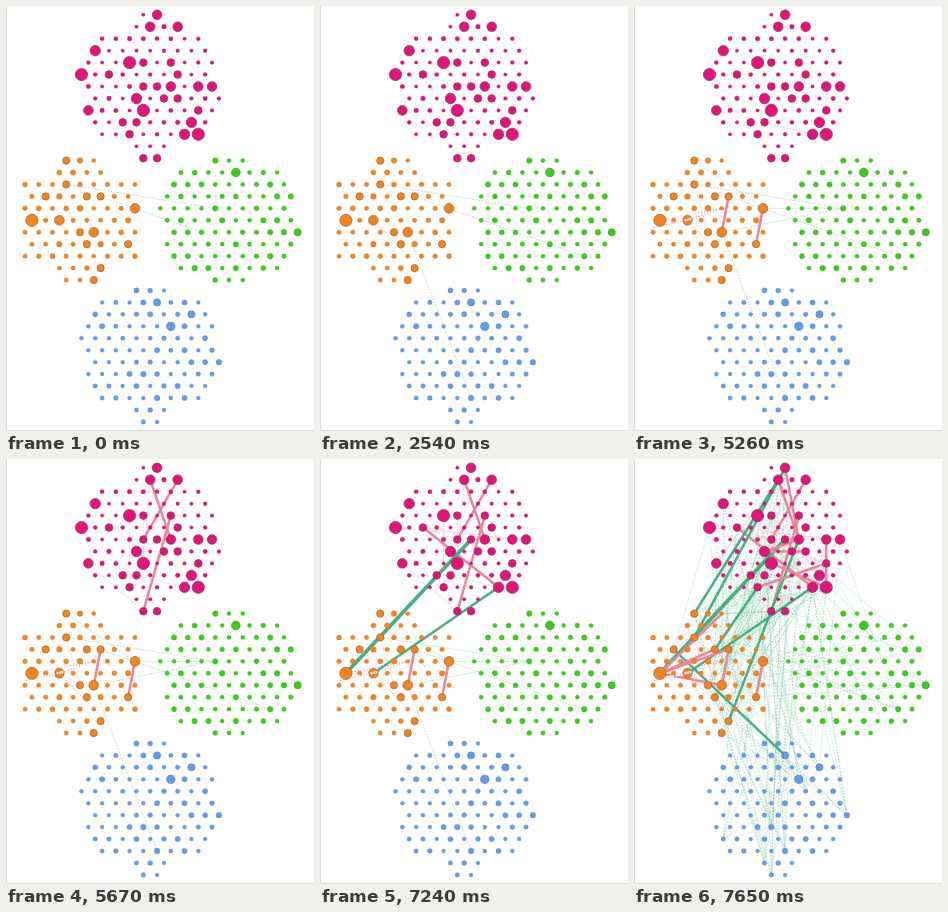
Recreate the animation shown at these times as an HTML page. Size 308 px wide and 425 px high, loop 8 s.

```html
<!DOCTYPE html>
<html lang="en">
<head>
<meta charset="utf-8">
<title>Cluster links</title>
<style>
html, body { margin: 0; width: 100%; height: 100%; overflow: hidden; background: #fff; }
svg { display: block; width: 100vw; height: 100vh; }
.step { animation: 8s step-end infinite; }
.fine { stroke-width: .7; stroke-dasharray: 2 1.2; }
.mint { stroke: #a9d6bd; }
.web { stroke: #6cc39b; opacity: .5; }
.rose { stroke: #f3b9c4; }
.red { stroke: #e0526a; stroke-dasharray: 1 2; }
.gap { stroke: #fff; stroke-width: 2.2; stroke-dasharray: 7 2; }
.pink { stroke: #ea8698; stroke-width: 2.5; }
.jade { stroke: #45b083; stroke-width: 2.5; }
.wide { stroke: #45b083; stroke-width: 3.8; }
</style>
</head>
<body>
<svg viewBox="0 0 308 425" preserveAspectRatio="none">
  <path d="M.5 0V424.5H308" fill="none" stroke="#dcdcdc"/>
  <g id="links"></g>
  <g id="dots"></g>
  <g id="over"></g>
</svg>
<script>
const NS = 'http://www.w3.org/2000/svg';
const LOOP = 8000, DX = 6.87, DY = 11.95;
const byId = id => document.getElementById(id);

function add(parent, tag, attrs) {
  const el = document.createElementNS(NS, tag);
  for (const k in attrs) el.setAttribute(k, attrs[k]);
  return parent.appendChild(el);
}

let seed = 41;
const rnd = () => (seed = seed * 16807 % 2147483647) / 2147483647;

// Half-width of a cluster by distance from its middle row.
const ROUND = [9, 10, 9, 8, 7, 2, 1], BLOCK = [8, 8, 8, 8, 3, 2];

// Hubs are grouped by radius and placed in grid steps from the centre.
const clusters = {
  p: { x: 144.2, y: 80.5, up: 6, down: 6, reach: ROUND, base: 1.75, fill: '#e8107a', rim: '#8c3a63', hubs: [
    [6.3, [[-3, -2], [-10, -1], [-1, 2], [7, 4]]],
    [5.4, [[-8, -3], [-2, 1], [6, 3], [5, 4]]],
    [5, [[1, -6], [0, -5], [4, -5], [3, 0], [7, 0], [9, 0], [-9, 2]]],
    [4, [[4, -1], [-1, -2], [3, -2], [-6, -1], [-1, 0], [2, 1], [4, 1],
      [-4, 3], [-2, 3], [-3, 4], [-1, 6], [1, 6], [7, 2], [1, 0]]]] },
  o: { x: 74, y: 214.3, up: 5, down: 5, reach: BLOCK, base: 2.2, fill: '#f5841f', rim: '#a9672a', hubs: [
    [6.3, [[-7, 0]]],
    [5, [[2, 1], [-3, 0], [8, -1]]],
    [3.8, [[-2, -5], [-2, -3], [-5, -2], [1, -2], [3, -2], [0, 1], [1, 2], [7, 2], [3, 4], [2, 5]]],
    [2.3, [[2, -5], [2, -1], [2, 3]]]] },
  g: { x: 223, y: 214.3, up: 5, down: 5, reach: ROUND, base: 2.1, fill: '#38d014', rim: '#3a9a26', hubs: [
    [4.5, [[1, -4]]],
    [3.7, [[10, 1]]],
    [3, [[6, -3], [9, -2], [6, 3], [1, 2], [-2, -1], [7, -2], [5, 0]]]] },
  b: { x: 144.2, y: 344.2, up: 5, down: 6, reach: ROUND, base: 2, fill: '#649ce8', rim: '#4f82c8', hubs: [
    [4.3, [[3, -2]]],
    [3.7, [[1, -4], [6, -3]]],
    [3.1, [[10, 1], [-1, 2], [1, 4]]],
    [2.5, [[-8, 3], [4, -1], [-2, 5], [-1, 6], [-5, -4]]]] }
};

const hubs = {};
for (const key in clusters) {
  const c = clusters[key], taken = new Set();
  hubs[key] = [];
  const dot = (dx, dy, r) => {
    const cx = c.x + DX * dx, cy = c.y + DY * dy;
    add(byId('dots'), 'circle', { cx, cy, r, fill: c.fill, stroke: c.rim, 'stroke-width': r > 3.2 ? .8 : .2 });
    taken.add(dx + ',' + dy);
    return [cx, cy];
  };
  for (const [r, spots] of c.hubs) {
    for (const [dx, dy] of spots) hubs[key].push(dot(dx, dy, r - .2));
  }
  for (let dy = -c.up; dy <= c.down; dy++) {
    const w = c.reach[Math.abs(dy)];
    for (let dx = -w; dx <= w; dx++) {
      const onGrid = (dx + dy) % 2 !== 0;
      const cut = Math.abs(dx) === 10 && dx * dy < 0;
      if (onGrid && !cut && !taken.has(dx + ',' + dy)) dot(dx, dy, c.base * (1 + .4 * rnd() ** 3));
    }
  }
}

// Groups appear at a set time and stay until the loop restarts.
const sheet = document.createElement('style');
document.head.append(sheet);
const made = new Set();
function stepAt(ms, layer) {
  const g = add(byId(layer), 'g', {});
  if (!ms) return g;
  if (!made.has(ms)) {
    made.add(ms);
    sheet.textContent += `@keyframes at${ms}{0%{visibility:hidden}${ms / LOOP * 100}%,100%{visibility:visible}}`;
  }
  g.setAttribute('class', 'step');
  g.style.animationName = 'at' + ms;
  return g;
}

function draw(ms, cls, lines, layer = 'links') {
  const g = stepAt(ms, layer);
  for (const [[x1, y1], [x2, y2]] of lines) add(g, 'line', { x1, y1, x2, y2, class: cls });
}

// 'o0-p3' joins hub 0 of the orange cluster to hub 3 of the pink one.
const hub = name => hubs[name[0]][+name.slice(1)];
const link = (ms, cls, list) => draw(ms, cls, list.split(' ').map(s => s.split('-').map(hub)));

const pick = list => list[Math.floor(rnd() * list.length)];
const web = (ms, cls, from, to, n) =>
  draw(ms, cls, Array.from({ length: n }, () => [pick(hubs[from]), pick(hubs[to])]));

const mint = 'fine mint', net = 'fine web', rose = 'fine rose', red = 'fine red';

web(7650, net, 'p', 'o', 60);
web(7650, net, 'p', 'b', 26);
web(7650, net, 'o', 'b', 22);
web(7650, net, 'p', 'g', 8);
web(7650, net, 'o', 'g', 5);
web(7650, rose, 'p', 'p', 16);
web(7650, rose, 'o', 'o', 8);
web(7450, net, 'p', 'o', 20);
web(7450, net, 'p', 'b', 7);
web(7450, net, 'o', 'b', 7);
web(7450, net, 'o', 'g', 3);
web(7450, rose, 'p', 'p', 8);
web(5670, rose, 'p', 'p', 9);

link(0, mint, 'o5-g6 o8-g4');
link(1150, red, 'o2-o16');
link(1310, mint, 'o1-b5');
link(2540, rose, 'g2-g7');
link(3910, red, 'o0-o15 o2-o15');
draw(3910, 'gap', [[[33, 218.5], [59, 212.5]]], 'over');
draw(3910, red, [[[20, 221.5], [60, 212.3]]], 'over');
link(5260, mint, 'o1-g6 o3-g6 o4-o3 p23-p7');
link(5260, rose, 'o5-o9 o2-o9 o8-o11');
link(5260, 'pink', 'o8-o1 o3-o11');
link(5670, 'pink', 'p9-p11 p10-p19 p17-p25');
link(6260, rose, 'p18-p12 p18-p21');
link(6640, rose, 'p1-p13');
link(7050, 'pink', 'p18-p7');
link(7240, 'wide', 'o0-p28');
link(7240, 'jade', 'o2-p7');
link(7450, 'jade', 'o6-b1 o7-p24');
link(7450, 'pink', 'p12-p3 o0-o7 o0-o8');
link(7450, net, 'p7-g5 p11-g5 p25-b8 p3-b7');
link(7450, rose, 'b6-b7 b1-b7 b6-b4');
link(7650, 'jade', 'o4-p9 o5-p8 o12-p11');
link(7650, 'pink', 'o0-o1 o0-o14 p5-p21 p5-p11 p24-p27 p2-p3 p8-p11');
link(7650, rose, 'b6-b0 b10-b2 b2-b7');
</script>
</body>
</html>
```
